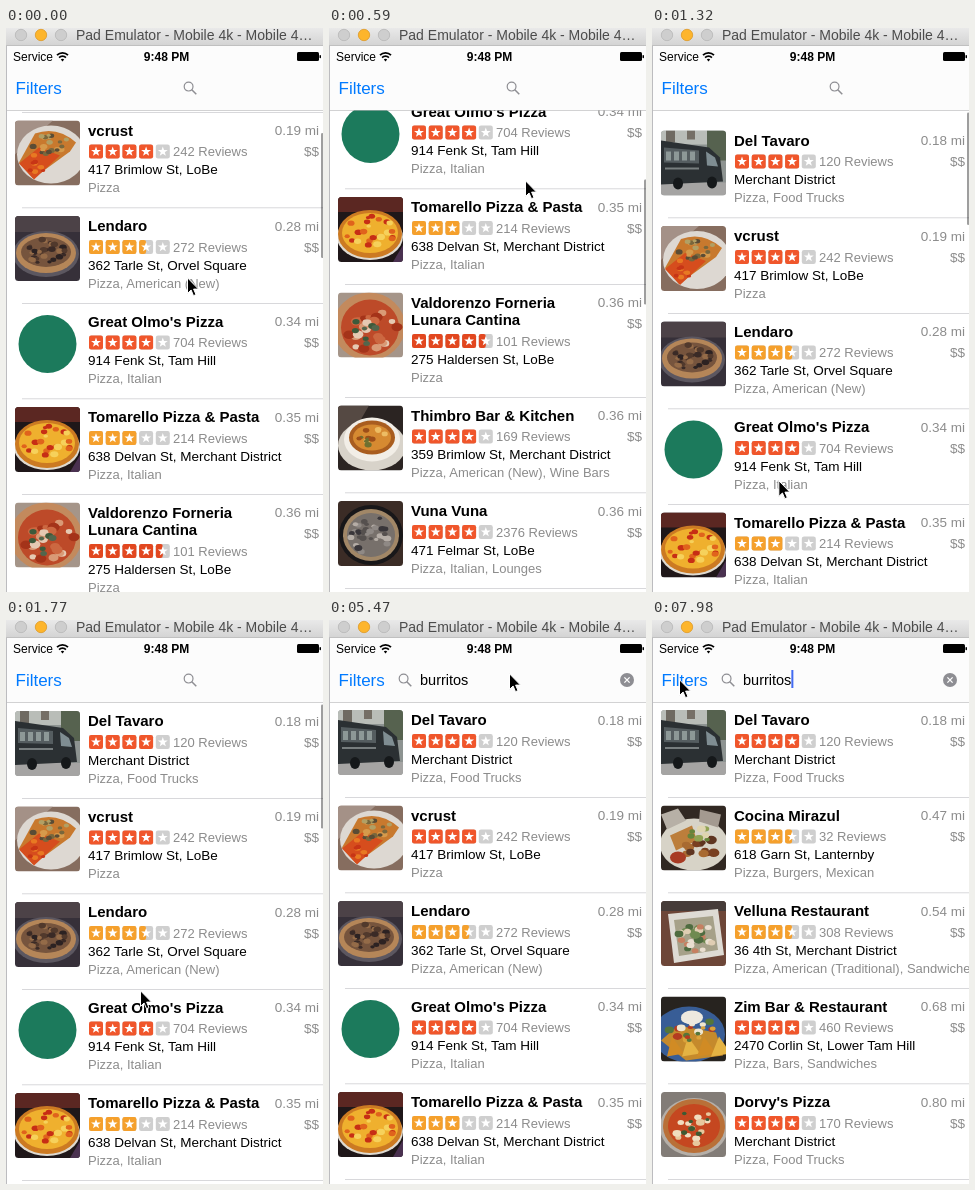
An HTML page that plays this animation: 317x564 px, repeating every 8000 ms.

```html
<!DOCTYPE html>
<html lang="en">
<head>
<meta charset="utf-8">
<title>Restaurant search</title>
<style>
html, body { margin: 0; width: 100%; height: 100%; overflow: hidden; background: #fff; }
svg { display: block; width: 100%; height: 100%; font: 13px "Liberation Sans", Arial, sans-serif; }
text { white-space: pre; }
.name { font-size: 15px; font-weight: bold; }
.address { font-size: 13.5px; }
.soft { fill: #8c8c8c; }
.right { font-size: 13.5px; fill: #8c8c8c; text-anchor: end; }
</style>
</head>
<body>
<svg id="stage" viewBox="0 0 317 564" xmlns="http://www.w3.org/2000/svg">
  <defs>
    <clipPath id="thumb"><rect width="65" height="65" rx="3.5"/></clipPath>
    <linearGradient id="bar" x2="0" y2="1"><stop stop-color="#e9e9e9"/><stop offset="1" stop-color="#d3d3d3"/></linearGradient>
  </defs>
  <rect width="317" height="564" fill="#fff"/>
  <g id="pizzaList"></g>
  <g id="burritoList"></g>
  <rect id="indicator" x="315" width="2.5" rx="1.2" fill="#000"/>

  <rect y="18" width="317" height="64" fill="#fcfcfc"/>
  <rect y="82" width="317" height=".6" fill="#b4b4b6"/>
  <text x="7" y="32.5" font-size="12">Service</text>
  <g fill="none" stroke="#000" stroke-width="1.7">
    <path d="M51 27.2a7.6 7.6 0 0 1 11 0M53.1 29.6a4.7 4.7 0 0 1 6.8 0"/>
    <path d="M56.5 33.4l-1.7-1.8a2.4 2.4 0 0 1 3.4 0Z" fill="#000" stroke="none"/>
  </g>
  <text x="160.5" y="32.5" font-size="12" font-weight="bold" text-anchor="middle">9:48 PM</text>
  <rect x="291" y="24" width="22" height="9" rx="1.5"/>
  <rect x="313.5" y="27" width="1.5" height="3.2" rx=".7"/>
  <text x="9.5" y="66.3" font-size="17" fill="#007aff">Filters</text>
  <g id="lens" fill="none" stroke="#8e8e93" stroke-width="1.2">
    <circle cx="-1.4" cy="-1.4" r="4.4"/><path d="M1.8 1.8L6.3 6.3" stroke-width="1.5"/>
  </g>
  <text id="query" x="91" y="64.5" font-size="14.5"></text>
  <rect id="caret" y="50" width="2" height="18" fill="#426bf2"/>
  <g id="clear">
    <circle cx="298" cy="60" r="7" fill="#8e8e93"/>
    <path d="M295.4 57.4l5.2 5.2m0-5.2l-5.2 5.2" stroke="#fff" stroke-width="1.3"/>
  </g>

  <rect width="317" height="18" fill="url(#bar)"/>
  <rect y="17.4" width="317" height=".6" fill="#b5b5b5"/>
  <g stroke-width=".8">
    <circle cx="15" cy="7" r="5.7" fill="#cecece" stroke="#b6b6b6"/>
    <circle cx="35" cy="7" r="5.7" fill="#fdb52c" stroke="#de9a26"/>
    <circle cx="55" cy="7" r="5.7" fill="#cecece" stroke="#b6b6b6"/>
  </g>
  <text x="70" y="12" font-size="14" fill="#4b4b4b">Pad Emulator - Mobile 4k - Mobile 4…</text>
  <rect y="18" width="1" height="546" fill="#bcbcbf"/>
  <path id="cursor" d="M0 0V15.6L3.6 12.2L6 17.9L8.5 16.8L6.1 11.3H11Z" stroke="#fff"/>
</svg>
<script>
const LOOP = 8000, STEP = 147.8, ROW = 95.5, TALL = 113, TOP = 82;
const $ = id => document.getElementById(id);

// Thumbnail helpers, drawn in a 65 by 65 box
const rect = (x, y, w, h, fill) => `<rect x="${x}" y="${y}" width="${w}" height="${h}" fill="${fill}"/>`;
const oval = (cx, cy, rx, ry, fill) => `<ellipse cx="${cx}" cy="${cy}" rx="${rx}" ry="${ry}" fill="${fill}"/>`;
const shape = (d, fill) => `<path d="${d}" fill="${fill}"/>`;
const back = fill => rect(0, 0, 65, 65, fill);

function bits(seed, count, cx, cy, rx, ry, size, colors) {
  const random = () => (seed = (seed * 16807) % 2147483647) / 2147483647;
  random();
  let out = "";
  for (let i = 0; i < count; i++) {
    const angle = random() * 2 * Math.PI, far = Math.sqrt(random()), r = size * (.6 + random() * .6);
    out += oval((cx + rx * far * Math.cos(angle)).toFixed(1), (cy + ry * far * Math.sin(angle)).toFixed(1),
      r.toFixed(1), (r * .75).toFixed(1), colors[i % colors.length]);
  }
  return out;
}

const art = {
  truck: back("#8d9391") + rect(0, 0, 65, 14, "#b9bdb8") + rect(5, 0, 9, 12, "#6f6a62") + rect(26, 0, 8, 9, "#756f66")
    + rect(46, 0, 19, 30, "#56624f") + rect(0, 52, 65, 13, "#a5a4a3")
    + shape("M0 10L48 17L59 27L62 51L0 54Z", "#2b3033") + shape("M3 17L38 20V33L3 32Z", "#555d60")
    + [5, 13, 21, 29].map(x => rect(x, 21, 5, 9, "#8d9897")).join("") + shape("M45 21L54 27L57 36L46 35Z", "#7f8d92")
    + rect(4, 37, 34, 2, "#787e7f") + oval(17, 53, 5, 6, "#15181a") + oval(51, 52, 5, 6, "#15181a"),
  slice: back("#866d5f") + shape("M0 0H38L9 25L0 34Z", "#a49187") + oval(36, 34, 34, 29, "#ddd8d2")
    + shape("M4 42L20 13Q42 5 61 22L55 31L18 58Z", "#c8792e") + shape("M4 43L24 27L45 35L19 59Z", "#d64d1d")
    + bits(7, 20, 36, 24, 19, 10, 3.2, ["#79673c", "#b1a065", "#5a4c35", "#d69a4b"])
    + bits(4, 9, 21, 43, 11, 10, 3, ["#e87922", "#c73516"]),
  dark: back("#363039") + rect(0, 0, 65, 16, "#4c4247") + oval(31, 38, 33, 23, "#5c5760") + oval(31, 37, 30, 20, "#b58658")
    + oval(31, 36, 25, 15, "#76543d") + bits(11, 32, 31, 35, 21, 13, 3.2, ["#3a2a26", "#51392c", "#946b48", "#2c2222"]),
  badge: back("#fff") + oval(32.5, 32.5, 29, 29, "#1c7a5c"),
  cheese: back("#1f1719") + rect(0, 0, 65, 15, "#5b2722") + oval(32, 40, 33, 23, "#dfdad0") + oval(32, 37, 32, 24, "#cc7a22")
    + oval(32, 36, 28, 20, "#efb02e") + bits(21, 25, 32, 35, 25, 17, 3.4, ["#c72e15", "#f6d15b", "#e0631c"])
    + shape("M55 65L65 48V65Z", "#4a3150"),
  margherita: back("#a59589") + oval(31, 34, 36, 34, "#c38a5d") + oval(32, 35, 29, 28, "#bd4a29")
    + bits(33, 22, 32, 34, 27, 25, 5, ["#e5c9b2", "#cc6841", "#d99a76", "#a43319"])
    + bits(8, 7, 30, 32, 21, 22, 4, ["#3d5a3b", "#53664c"]),
  soup: back("#2b2422") + shape("M0 0H31L9 38L0 42Z", "#554943") + oval(34, 40, 34, 25, "#d8d3ca") + oval(34, 34, 28, 22, "#f2eee7")
    + oval(34, 32, 23, 17, "#a95d1f") + oval(34, 32, 19, 13, "#d68a31")
    + bits(14, 12, 34, 32, 15, 10, 3.2, ["#edbc63", "#9d4e19", "#6e7030"]),
  pan: back("#3b2c26") + oval(33, 34, 32, 30, "#181719") + oval(33, 34, 28, 26, "#a18767") + oval(33, 34, 24, 22, "#77706b")
    + bits(23, 30, 33, 34, 21, 19, 3.4, ["#b5ada6", "#55504e", "#8f8985", "#39363a"]),
  wraps: back("#312822") + oval(33, 39, 34, 26, "#d7d3c7") + shape("M0 9L17 3L25 15L6 24Z", "#b7b0a6") + shape("M39 4L60 9L57 22L38 16Z", "#a49a90")
    + shape("M9 30L31 20L36 35L15 45Z", "#bc7e3b") + bits(16, 12, 40, 43, 17, 12, 4.8, ["#793f21", "#a86a31", "#5f3521"])
    + bits(9, 9, 41, 29, 14, 6, 4, ["#66843a", "#91a353", "#dfd5b0"]) + oval(17, 52, 8, 6, "#a83b24"),
  box: back("#6d4638") + rect(0, 0, 65, 10, "#463c39") + shape("M7 13L57 8L63 54L13 62Z", "#dedbd4") + shape("M13 19L52 15L57 49L18 55Z", "#a6a189")
    + bits(31, 25, 35, 35, 18, 16, 4.6, ["#6f8a50", "#dfcdb3", "#c68062", "#4f6c40", "#e9ded0"]),
  nachos: back("#27231f") + oval(28, 38, 36, 28, "#385d96") + shape("M0 44L17 29L55 36L62 59L25 64Z", "#c58a2c")
    + [6, 21, 36, 50].map((x, i) => shape(`M${x} 60l${5 + i} -20l12 17Z`, i % 2 ? "#e5b343" : "#d18b24")).join("")
    + bits(19, 19, 31, 32, 23, 12, 4, ["#b43b20", "#efe6cf", "#55763a", "#dba33b"]) + oval(31, 21, 11, 7, "#eee9df"),
  round: back("#827c77") + oval(33, 35, 34, 29, "#b5afa8") + oval(33, 34, 31, 27, "#b97038") + oval(33, 34, 26, 22, "#c54720")
    + bits(27, 13, 33, 34, 22, 18, 4, ["#f0ddbf", "#e7c89d"]) + bits(5, 6, 33, 34, 20, 17, 3, ["#3f5a32"])
};

function stars(rating, y) {
  const color = rating < 3.8 ? "#f5a02c" : rating > 4.2 ? "#e2471f" : "#f0562b";
  const points = Array.from({ length: 10 }, (_, i) => {
    const r = i % 2 ? 2.1 : 5.2, a = i * Math.PI / 5;
    return `${(7 + r * Math.sin(a)).toFixed(2)},${(7.1 - r * Math.cos(a)).toFixed(2)}`;
  }).join(" ");
  let out = "";
  for (let i = 0; i < 5; i++) {
    const part = Math.max(0, Math.min(1, rating - i));
    out += `<g transform="translate(${83 + i * 16.7} ${y})"><rect width="14" height="14" rx="2.2" fill="#cfcfcf"/>`
      + (part ? `<rect width="${14 * part}" height="14" rx="2.2" fill="${color}"/>` : "")
      + `<polygon points="${points}" fill="#fff"/></g>`;
  }
  return out;
}

function row([picture, name, miles, rating, reviews, address, kinds], y) {
  const lines = name.split("|"), shift = lines.length > 1 ? TALL - ROW : 0;
  const text = (x, dy, kind, content) => `<text x="${x}" y="${dy}" class="${kind}">${content}</text>`;
  return `<g transform="translate(0 ${y})">
    <g transform="translate(9 8)" clip-path="url(#thumb)">${art[picture]}</g>
    ${lines.map((line, i) => text(82, 23 + i * 17.5, "name", line)).join("")}
    ${text(313, 22.5, "right", miles + " mi")}${text(313, 43.5, "right", "$$")}
    <g transform="translate(0 ${shift})">${stars(rating, 32)}
    ${text(167, 43.5, "soft", reviews + " Reviews")}${text(82, 61.7, "address", address)}${text(82, 79.7, "soft", kinds)}
    <rect x="16" y="95" width="301" height=".7" fill="#c8c7cc"/></g></g>`;
}

function fill(list, rows) {
  let y = TOP;
  list.innerHTML = rows.map(item => {
    const html = row(item, y);
    y += item[1].includes("|") ? TALL : ROW;
    return html;
  }).join("");
}

const first = ["truck", "Del Tavaro", "0.18", 4, 120, "Merchant District", "Pizza, Food Trucks"];
fill($("pizzaList"), [
  first,
  ["slice", "vcrust", "0.19", 4, 242, "417 Brimlow St, LoBe", "Pizza"],
  ["dark", "Lendaro", "0.28", 3.5, 272, "362 Tarle St, Orvel Square", "Pizza, American (New)"],
  ["badge", "Great Olmo's Pizza", "0.34", 4, 704, "914 Fenk St, Tam Hill", "Pizza, Italian"],
  ["cheese", "Tomarello Pizza &amp; Pasta", "0.35", 3, 214, "638 Delvan St, Merchant District", "Pizza, Italian"],
  ["margherita", "Valdorenzo Forneria|Lunara Cantina", "0.36", 4.5, 101, "275 Haldersen St, LoBe", "Pizza"],
  ["soup", "Thimbro Bar &amp; Kitchen", "0.36", 4, 169, "359 Brimlow St, Merchant District", "Pizza, American (New), Wine Bars"],
  ["pan", "Vuna Vuna", "0.36", 4, 2376, "471 Felmar St, LoBe", "Pizza, Italian, Lounges"],
  ["dark", "Sablorin", "0.37", 4, 188, "530 Felmar St, LoBe", "Pizza"]
]);
fill($("burritoList"), [
  first,
  ["wraps", "Cocina Mirazul", "0.47", 3.5, 32, "618 Garn St, Lanternby", "Pizza, Burgers, Mexican"],
  ["box", "Velluna Restaurant", "0.54", 3.5, 308, "36 4th St, Merchant District", "Pizza, American (Traditional), Sandwiches"],
  ["nachos", "Zim Bar &amp; Restaurant", "0.68", 4, 460, "2470 Corlin St, Lower Tam Hill", "Pizza, Bars, Sandwiches"],
  ["round", "Dorvy's Pizza", "0.80", 4, 170, "Merchant District", "Pizza, Food Trucks"]
]);

const scrollKeys = [[0, 93], [1, 205], [2, 311], [3, 336], [4, 303], [5, 212], [6, 108], [7, 35], [8, -9], [9, -12.5], [10, -6], [11, -2.5], [12, -1], [13, 0]];
const cursorKeys = [[0, 181, 249], [1, 201, 152], [2, 214, 91], [3, 212, 92], [4, 196, 152], [5, 171, 260], [6, 152, 364], [7, 136, 430], [8, 127, 452],
  [11, 125, 452], [12, 134, 370], [13, 155, 210], [14, 174, 90], [15, 180, 56], [16, 180, 53], [50, 180, 53], [51, 163, 65], [52, 108, 74], [53, 50, 67], [54, 27, 59]];
const fadeKeys = [[13, .38], [15, .1], [16, 0]];
const lensKeys = [[17, 184], [18, 112], [19, 76]];
const typeKeys = [[0, 0], [26, 1], [27, 3], [28, 4], [30, 5], [31, 6], [32, 7], [33, 8]];
const caretKeys = [[0, 0], [19, 1], [23, .5], [24, 0], [26, 1], [36, .5], [37, 0], [39, .5], [40, 1], [43, .5], [44, 0],
  [46, .5], [47, 1], [50, .5], [51, 0], [53, .5], [54, 1]];

function glide(keys, tick) {
  const next = keys.findIndex(key => key[0] > tick);
  if (next < 0) return keys[keys.length - 1].slice(1);
  if (next === 0) return keys[0].slice(1);
  const a = keys[next - 1], b = keys[next], part = (tick - a[0]) / (b[0] - a[0]);
  return a.slice(1).map((value, i) => value + (b[i + 1] - value) * part);
}
const hold = (keys, tick) => keys.filter(key => key[0] <= tick).pop()[1];

function draw(time) {
  const tick = Math.floor((time + 14) / STEP);
  const [scroll] = glide(scrollKeys, tick), [x, y] = glide(cursorKeys, tick);
  const found = tick >= 39;
  $("pizzaList").style.display = found ? "none" : "";
  $("burritoList").style.display = found ? "" : "none";
  $("pizzaList").setAttribute("transform", `translate(0 ${-scroll})`);
  $("indicator").setAttribute("y", 84.5 + Math.max(0, scroll) * .221);
  $("indicator").setAttribute("height", 125 + Math.min(0, scroll));
  $("indicator").setAttribute("opacity", glide(fadeKeys, tick)[0]);
  $("lens").setAttribute("transform", `translate(${glide(lensKeys, tick)[0]} 60)`);
  const count = hold(typeKeys, tick), query = $("query");
  query.textContent = "burritos".slice(0, count);
  $("caret").setAttribute("x", count ? 91 + query.getComputedTextLength() : 90);
  $("caret").setAttribute("opacity", hold(caretKeys, tick));
  $("clear").style.display = count ? "" : "none";
  $("cursor").setAttribute("transform", `translate(${x + .5} ${y + .8})`);
}

const start = performance.now();
function frame() {
  draw((performance.now() - start) % LOOP);
  requestAnimationFrame(frame);
}
frame();
</script>
</body>
</html>
```
